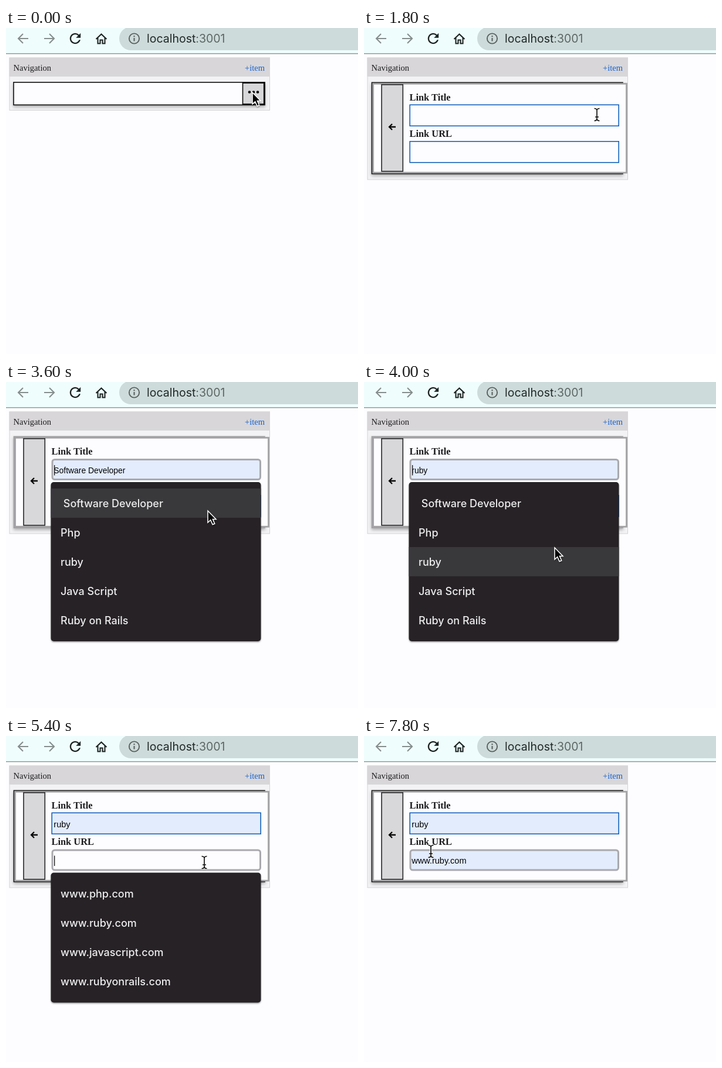
These frames come from a looping animation (600 by 557 pixels, 8000 ms). An HTML page:

```html
<!DOCTYPE html>
<html lang="en">
<head>
<meta charset="utf-8">
<title>Navigation editor</title>
<style>
  html, body { margin: 0; width: 100%; height: 100%; overflow: hidden; background: #fdfcfe; }
  svg { display: block; width: 600px; height: 557px; }
  text { white-space: pre; }
  .ui { font-family: Inter, "Open Sans", sans-serif; }
  .bar { font-size: 19.5px; fill: #202827; }
  .option { font-size: 18px; font-weight: 500; fill: #ededee; }
  .serif { font: 14.5px "Liberation Serif", Times, serif; fill: #1c1b1d; }
  .label { font: bold 16.4px "Liberation Serif", Times, serif; fill: #1c1b1d; }
  .value { font: 14.5px "Liberation Sans", Arial, sans-serif; }
  .preview { font-size: 13.9px; }
  .line { fill: none; stroke-width: 2.1; }
</style>
</head>
<body>
<svg viewBox="0 0 600 557">
  <defs>
    <filter id="soft" x="-10%" y="-20%" width="120%" height="150%">
      <feDropShadow dx="0" dy="3" stdDeviation="2.5" flood-opacity=".28"/>
    </filter>
    <filter id="drop" x="-40%" y="-40%" width="180%" height="180%">
      <feDropShadow dx="0" dy="1.5" stdDeviation="1.3" flood-opacity=".4"/>
    </filter>
  </defs>
  <rect width="600" height="557" fill="#fdfcfe"/>
  <rect width="600" height="43" fill="#effefd"/>
  <rect y="43" width="600" height="1.5" fill="#969b9c"/>
  <rect x="193" y="-2" width="450" height="40" rx="20" fill="#cddbda"/>
  <g class="line" stroke="#858d8d">
    <path d="M38 18H21M29 10L21 18L29 26"/>
    <path d="M65 18H82M74 10L82 18L74 26"/>
  </g>
  <path transform="translate(104.2 4.2) scale(1.15)" fill="#1d2323"
    d="M17.65 6.35A8 8 0 1 0 19.73 14h-2.08A6 6 0 1 1 12 6c1.66 0 3.14.69 4.22 1.78L13 11h7V4z"/>
  <path class="line" stroke="#1d2323" d="M153.5 19L162.5 10.5L171.5 19M156.5 17V26.5H160.5V20.5H164.5V26.5H168.5V17"/>
  <g class="line" stroke="#59615f">
    <circle cx="218.500" cy="18" r="8.6" stroke-width="1.9"/>
    <path d="M218.500 17V22.500M218.500 13V15.200"/>
  </g>
  <text class="ui bar" x="240" y="25">localhost<tspan fill="#5b6664">:3001</tspan></text>
  <g id="stage"></g>
</svg>
<script>
const LOOP = 8000;
const lists = {
  title: [" Software Developer", "Php", "ruby", "Java Script", "Ruby on Rails"],
  url: ["www.php.com", "www.ruby.com", "www.javascript.com", "www.rubyonrails.com"]
};
const fields = { title: 131, url: 193.5 };

// Each step changes only the named parts: time, pointer x, y, other changes.
const steps = [
  [0, 420, 110, { pointer: "arrow", view: "row", title: "", url: "", list: null, pick: -1 }],
  [200, 420, 110, { view: "menu" }],
  [600, 424, 126],
  [800, 425, 164],
  [1000, 424, 190],
  [1200, 418, 180],
  [1400, 408, 162],
  [1600, 399, 150],
  [1800, 397, 148, { view: "form", pointer: "beam", hover: true }],
  [2000, 385, 149],
  [2200, 370, 150],
  [2400, 358, 152],
  [2600, 354, 153, { focus: "title", list: "title", caret: true }],
  [2800, 350, 158],
  [3000, 347, 175, { pointer: "arrow", hover: false }],
  [3200, 346, 200, { pick: 0 }],
  [3400, 345, 212],
  [3600, 344, 220],
  [3800, 337, 250, { pick: 1 }],
  [4000, 325, 283, { pick: 2 }],
  [4200, 322, 285],
  [4600, 322, 285, { list: null, pick: -1, title: "ruby" }],
  [4800, 325, 268],
  [5000, 332, 240, { hover: true }],
  [5200, 337, 220, { pointer: "beam" }],
  [5400, 338, 216, { focus: "url", list: "url" }],
  [6000, 333, 240, { pointer: "arrow", hover: false }],
  [6200, 326, 264, { pick: 0 }],
  [6400, 318, 289],
  [6600, 311, 307, { pick: 1 }],
  [6800, 308, 313],
  [7000, 308, 313, { list: null, pick: -1, url: "www.ruby.com" }],
  [7200, 285, 287],
  [7400, 228, 252, { caret: false }],
  [7600, 160, 218, { pointer: "beam", hover: true }],
  [7800, 114, 197]
];

const states = [];
for (const [t, x, y, change] of steps)
  states.push({ ...states.at(-1), t, x, y, ...change });

const box = (x, y, w, h, fill, stroke = "none", width = 1, more = "") =>
  `<rect x="${x}" y="${y}" width="${w}" height="${h}" fill="${fill}" stroke="${stroke}" stroke-width="${width}" ${more}/>`;
const text = (x, y, cls, s, more = "") => `<text x="${x}" y="${y}" class="${cls}" ${more}>${s}</text>`;

function panel(bottom) {
  return box(6, 51, 443.5, bottom - 51, "#f3f2f4", "#d2d1d3") +
    box(5.5, 50.5, 444.5, 32.5, "#d8d6d8") +
    text(12.5, 72.5, "serif", "Navigation") +
    text(407, 72.5, "serif", "+item", 'style="fill:#1262d3"');
}

function row() {
  const dots = [415, 422, 429].map(x => `<circle cx="${x}" cy="109.5" r="2.3"/>`).join("");
  return panel(140.5) +
    box(13, 92.8, 428, 38.6, "#fdfcfe", "#111", 1.6, 'filter="url(#soft)"') +
    box(403.5, 93.5, 37, 37, "#d7d6d8", "#0a0a0a", 1.6) +
    `<path d="M403 93.5H440.2V130.6H403" fill="none" stroke="#0a0a0a" stroke-width="2.6"/>` + dots;
}

function menu() {
  return ["Edit", "Delete"].map((s, i) => {
    const y = 132 + i * 39;
    return box(352, y, 89, 38, "#d7d6d8", "#222", 1.5) + text(364, y + 24, "serif", s);
  }).join("");
}

function field(name, s) {
  const y = fields[name], active = s.focus === name;
  const preview = s.list === name && s.pick >= 0;
  const value = preview ? lists[name][s.pick].trim() : s[name];
  const fill = value ? "#e2ecfd" : "#fdfcfe";
  let out = active
    ? box(79, y + 1.5, 354.5, 34, fill, "#a9a9ae", 3, 'rx="4"')
    : box(78.2, y + .3, 356, 36, fill, "#1463bd", 1.6);
  out += text(81.3, y + 24.5, preview ? "value preview" : "value", value);
  if (active && s.caret) {
    const x = value && !preview ? 110 + (value.length - 4) * 8.1 : 82;
    out += box(x, y + 11, 1.3, 17.5, "#111");
  }
  return out;
}

function form(s) {
  const edge = s.hover ? "#161518" : "#a09fa2";
  return panel(259) +
    box(13.7, 93.5, 427, 155.3, "#fdfcfe", edge, 2.2, 'filter="url(#soft)"') +
    box(15.5, 95.2, 432, 152, "#fdfcfe", "#a3a2a5", 2.8) +
    box(30, 96.8, 36.3, 148, "#d8d7d9", "#252427", 1.6) +
    `<path d="M54 169H43M48 164L43 169L48 174" fill="none" stroke="#080808" stroke-width="2.3"/>` +
    text(77.5, 124, "label", "Link Title") + text(77.5, 186.3, "label", "Link URL") +
    field("title", s) + field("url", s);
}

function popup(s) {
  const items = lists[s.list], top = fields[s.list] + 40;
  let out = box(76.5, top, 358, items.length * 50 + 22, "#252427", "none", 0, 'rx="5" filter="url(#drop)"');
  items.forEach((item, i) => {
    const y = top + 11 + i * 50;
    if (i === s.pick) out += box(76.5, y, 358, 50, "#39383b");
    out += text(93, y + 31.7, "ui option", item);
  });
  return out;
}

const pointers = {
  arrow: `<path d="M0 0V20L4.7 15.700L8.200 23.500L11.700 22L8.400 14.400H14Z" fill="#060606" stroke="#fff" stroke-width="1.5" filter="url(#drop)"/>`,
  beam: ["#fff", "#111"].map((c, i) =>
    `<path d="M-4.500 -10.500Q-.5 -10.500 0 -7.500Q.5 -10.500 4.500 -10.500M0 -7.500V8M-4.500 10.500Q-.5 10.500 0 7.500Q.5 10.500 4.500 10.500M-3 4H3" fill="none" stroke="${c}" stroke-width="${i ? 1.7 : 3.4}"/>`).join("")
};

function draw(s) {
  return (s.view === "form" ? form(s) : row()) +
    (s.view === "menu" ? menu() : "") +
    (s.list ? popup(s) : "") +
    `<g transform="translate(${s.x} ${s.y})">${pointers[s.pointer]}</g>`;
}

const stage = document.getElementById("stage");
const start = performance.now();
let shown;
function tick() {
  const t = (performance.now() - start) % LOOP;
  const state = states.findLast(s => s.t <= t);
  if (state !== shown) stage.innerHTML = draw(shown = state);
  requestAnimationFrame(tick);
}
tick();
</script>
</body>
</html>
```
